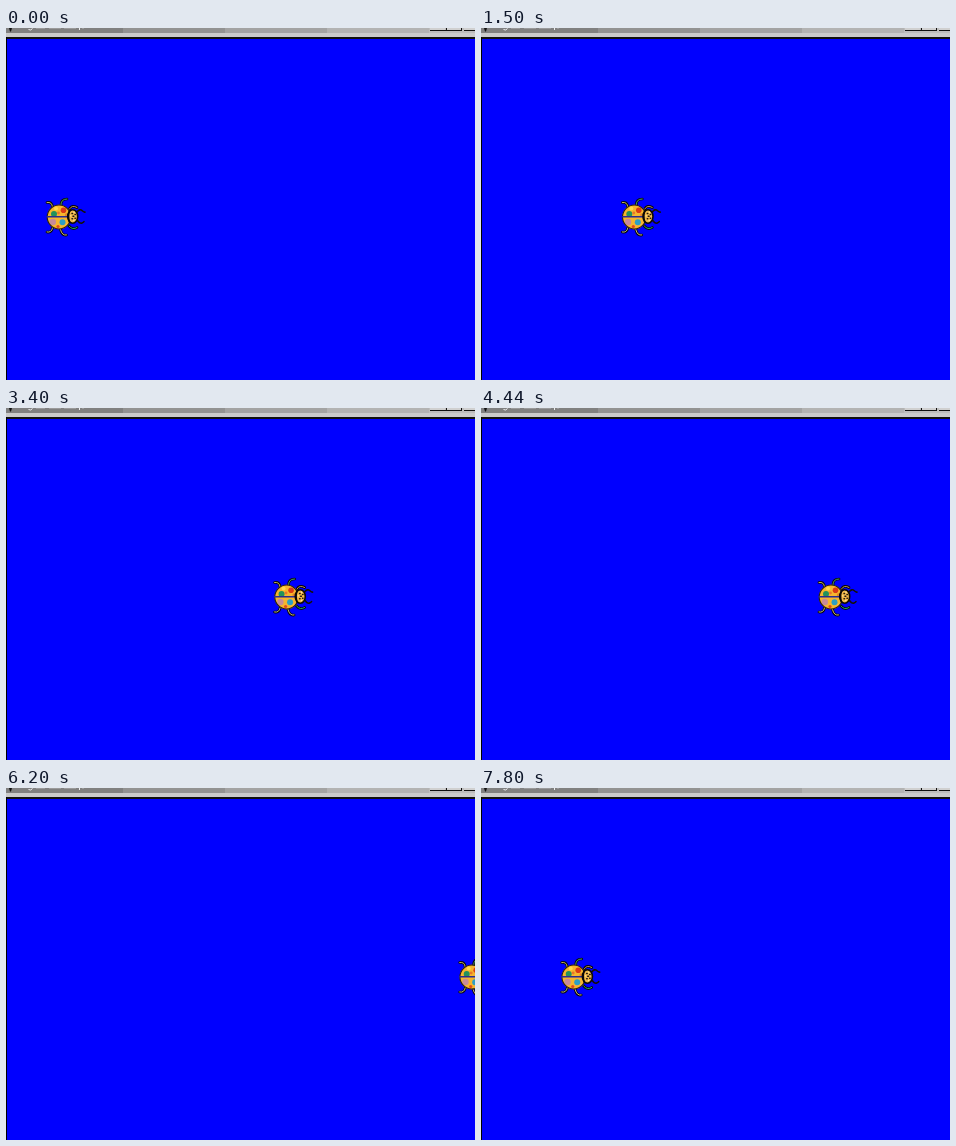
Recreate the animation shown at these times as an HTML page. Size 469 px wide and 352 px high, loop 7.9 s.

```html
<!DOCTYPE html>
<html lang="en">
<head>
<meta charset="utf-8">
<title>Walking beetle</title>
<style>
html, body { margin: 0; width: 100%; height: 100%; overflow: hidden; background: #00f; }
svg { display: block; width: 469px; height: 352px; }
</style>
</head>
<body>
<svg viewBox="0 0 469 352">
  <defs>
    <clipPath id="stage"><path d="M1 11H469V352H1Z"/></clipPath>
    <clipPath id="shell"><ellipse cx="53" cy="189" rx="11.3" ry="11.6"/></clipPath>
  </defs>
  <rect width="469" height="352" fill="#00f"/>

  <g id="bar" shape-rendering="crispEdges">
    <rect width="469" height="5" fill="#bdbdbd"/>
    <rect width="117" height="5" fill="#808080"/>
    <rect x="117" width="102" height="5" fill="#929292"/>
    <rect x="219" width="102" height="5" fill="#a3a3a3"/>
    <rect x="321" width="102" height="5" fill="#b3b3b3"/>
    <rect y="5" width="469" height="4" fill="#cbcbcb"/>
    <rect y="9" width="469" height="2" fill="#111"/>
    <rect y="9" width="1" height="343" fill="#000"/>
    <path d="M424 0H439V2H424ZM441 0H455V2H441ZM458 0H469V2H458Z" fill="#d0d0d0"/>
    <path d="M424 2.5H440M440 0V3M441 2.5H456M455.5 0V3M458 2.5H469" stroke="#111" fill="none"/>
  </g>
  <path d="M3 0H6L5 3.5H4Z" fill="#111"/>
  <path d="M22.5 1.5Q25 3 26.5 .5M73.5 0V2" stroke="#eee" fill="none"/>
  <path d="M30 .3H39M43 .3H55M58 .3H70M76 .3H78" stroke="#b5b5b5" stroke-width=".6"/>

  <g clip-path="url(#stage)">
    <g id="bug" stroke-linecap="round" stroke-linejoin="round">
      <g id="legs" fill="none"></g>
      <path d="M71 184Q74 180.5 76 182.5T79 184M71 192Q74 196 76 195T78 193.5" fill="none" stroke="#151008" stroke-width="1.6"/>
      <ellipse cx="53" cy="189" rx="12" ry="12.2" fill="#f6b52d"/>
      <g id="spots" clip-path="url(#shell)"></g>
      <ellipse cx="53" cy="189" rx="11.8" ry="12" fill="none" stroke="#241a16" stroke-width="1.1"/>
      <path d="M41 188.7H63" stroke="#2b2d90" stroke-width="1.5"/>
      <ellipse cx="66.7" cy="188.5" rx="5" ry="6.7" fill="#efb84a" stroke="#0c0905" stroke-width="1.6"/>
      <path d="M63.5 183Q61.5 188.5 63.5 194" fill="none" stroke="#0c0905" stroke-width="1.6"/>
      <path d="M66 185.5h.5M69 186.5h.4M66 190.8h.5M69 190.2h.4M67 188.3h.8" stroke="#23180d" stroke-width="1.5"/>
      <path d="M64.7 187.8h.2M68 184.2h.2M67.8 192.5h.2" stroke="#fff0b0" stroke-width="1.2"/>
    </g>
  </g>
</svg>
<script>
const NS = "http://www.w3.org/2000/svg";
const LOOP = 7900, STRIDE = 54 / 14, START = 59, WRAP = 481;
const LEAD = 11;
// Gait phases: first step, last step (ms), number of steps.
const phases = [
  [60, 800, 14], [860, 1620, 14], [1680, 2420, 14], [2480, 3230, 14], [3290, 4040, 14],
  [4100, 4860, 14], [4920, 5690, 14], [5750, 6530, 15], [6590, 7350, 14], [7400, 7800, 8]
];
const legs = [
  ["M46.5 179Q46 173.5 41 174.5", "#c4b45c"],
  ["M55 177.5Q54.5 171 61 171", "#479a68"],
  ["M63.5 181Q66 176.5 71 179.5", "#b58b58"],
  ["M46.5 200Q45.5 205 41 204", "#b4b48c"],
  ["M54.5 201.5Q56 208 60.5 207", "#c8b47c"],
  ["M63 198Q66.5 202.5 71 199.5", "#20a868"]
];
const spots = [
  [57.5, 182.2, 2.8, "#d93a16"], [48, 186, 3, "#22925c"], [46.8, 194, 3.2, "#c88a98"],
  [56.5, 194.3, 3, "#2c9fc4"], [52, 198.5, 1.6, "#e04a1c"], [50, 180.5, 2, "#ffd84a"],
  [60.5, 187, 1.7, "#e58524"], [52.5, 185, 1.4, "#e9772a"], [60.8, 197, 1.5, "#f1c447"]
];

function add(parent, tag, attrs) {
  const node = document.createElementNS(NS, tag);
  for (const key in attrs) node.setAttribute(key, attrs[key]);
  document.getElementById(parent).append(node);
}

for (const [d, color] of legs) {
  add("legs", "path", { d, stroke: "#080806", "stroke-width": 2.7 });
  add("legs", "path", { d, stroke: color, "stroke-width": 1 });
}
for (const [cx, cy, r, fill] of spots) add("spots", "circle", { cx, cy, r, fill });

function stepsAt(time) {
  let steps = 0;
  for (const [first, last, count] of phases) {
    if (time < first) break;
    const gap = (last - first) / (count - 1);
    steps += Math.min(count, Math.floor((time - first) / gap) + 1);
  }
  return steps;
}

const bug = document.getElementById("bug");
const origin = performance.now();

function draw(now) {
  const time = Math.max(0, now - origin) % LOOP;
  const center = (START + stepsAt(time + LEAD) * STRIDE) % WRAP;
  bug.setAttribute("transform", `translate(${(center - START).toFixed(2)} 0)`);
  requestAnimationFrame(draw);
}
draw(origin);
</script>
</body>
</html>
```
